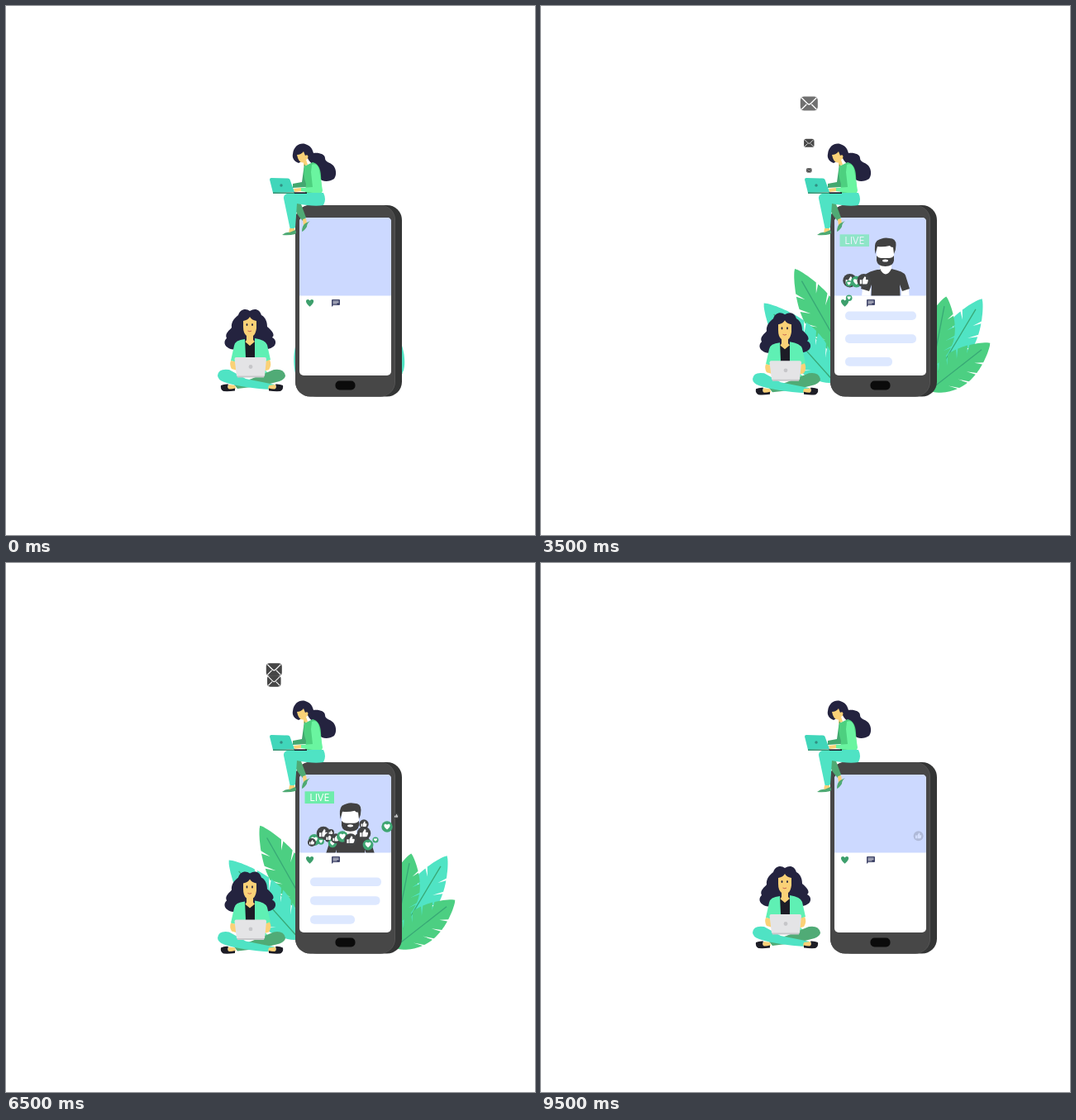
Recreate the animation shown at these times as an HTML page. Size 640x640 px, loop 9570 ms.

```html
<!DOCTYPE html>
<html lang="en">
<head>
<meta charset="utf-8">
<title>Live stream</title>
<style>
  html, body { margin: 0; width: 100%; height: 100%; overflow: hidden; background: #fff; }
  svg { display: block; width: 100vw; height: 100vh; }
  text { font: 12.3px "Open Sans", "Noto Sans", sans-serif; fill: #fff; }
</style>
</head>
<body>
<svg viewBox="0 0 640 640">
  <defs>
    <clipPath id="video"><path d="M355 350.5V261q0-5 5-5h101q5 0 5 5v89.5z"/></clipPath>
    <clipPath id="feed"><rect x="355" y="351" width="111" height="96"/></clipPath>
    <path id="heartShape" d="M0 5.2C-8-1-5.5-5-2.8-5-1.2-5 0-3.4 0-3.4S1.2-5 2.8-5C5.5-5 8-1 0 5.2z"/>
    <g id="heart"><circle r="10" fill="#3fa673"/><use href="#heartShape" fill="#fff"/></g>
    <g id="thumb">
      <circle r="10" fill="#434546"/>
      <path fill="#fff" d="M-6-1h3v6h-3zM-2-1 1-6q2 0 2 2L2.500-1.500H5q1.500 0 1 2L5 4q-.5 1.200-2 1.200h-5z"/>
    </g>
    <g id="mail">
      <rect x="-10.500" y="-8.500" width="21" height="17" rx="4.500" fill="#464646"/>
      <path d="M-9-7-2 0Q0 2 2 0L9-7M-9 7-3 1M9 7 3 1" fill="none" stroke="#fff" stroke-width="1.300"/>
    </g>
    <g id="foot">
      <path fill="#fad177" d="M269 458l8 1 1 4-6 2-4-2z"/>
      <path fill="#1d1d26" d="M260 459q4-2 9-1.500-2 5 1 6 4 0 7-1v3q-8 1-14 .5-4-2-3-7z"/>
    </g>
  </defs>

  <g id="leaves"></g>

  <!-- phone -->
  <rect x="358" y="241" width="121" height="231.500" rx="18" fill="#343535"/>
  <rect x="350" y="241" width="121" height="231.500" rx="18" fill="#5b5b5b"/>
  <rect x="350" y="241" width="120.300" height="231.500" rx="18" fill="#474747"/>
  <rect x="355" y="256" width="111" height="191" rx="5" fill="#fff"/>
  <rect x="398.500" y="453.500" width="24" height="11" rx="5" fill="#0b0b0b"/>
  <g id="bars" clip-path="url(#feed)" fill="#dde8ff"></g>
  <g clip-path="url(#video)">
    <rect x="355" y="256" width="111" height="95" fill="#ccd9ff"/>
    <g id="host">
      <path fill="#fff" d="M389 342h10l-1 18h-11zM436 342h9l1 18h-10zM406 289h21v17l-3 6v9q-7 8-14 0v-9l-4-6z"/>
      <path fill="#414141" d="M410 318q7 13 14 0 15 3 17 8l5 16-9 3-3-8 1 25h-36l1-25-3 8-10-3 5-16q3-5 19-8z"/>
      <path fill="#414141" d="M404.500 300q-2-12 2-16 8-5 15-3 8 0 8 8 0 6-2.500 11l-1-8q-3 0-4-2-8 2-15 1z"/>
      <path fill="#414141" d="M406 302v6q1 7 10.500 7T427 308v-6q-2 3-6 3h-9q-4 0-6-3z"/>
      <ellipse cx="416.500" cy="308" rx="3.500" ry="1.600" fill="#fff"/>
    </g>
  </g>
  <g id="live">
    <rect x="361.500" y="276.300" width="35.500" height="14.700" fill="#6eecab"/>
    <text x="379.300" y="288" text-anchor="middle">LIVE</text>
  </g>
  <use href="#heartShape" transform="translate(367.600 359.300) scale(.85)" fill="#3d9f6c"/>
  <path fill="#41466a" d="M395 355h8q1 0 1 1v5q0 1-1 1h-7l-2 2v-8q0-1 1-1z"/>
  <path stroke="#fff" stroke-width=".7" d="M395.500 357h7M395.500 358.600h7M395.500 360.200h5"/>

  <g id="mails"></g>

  <!-- woman on the phone -->
  <g>
    <path fill="#24233f" d="M347 179C348 169 356 165 362 167 369 169 371 174 372 178 378 177 386 179 386 184 386 189 392 189 396 193 400 198 400 205 397 209 391 213 382 213 379 208 376 202 378 196 372 192 368 189 366 187 365 184L354 190C348 188 346 183 347 179z"/>
    <path fill="#fad177" d="M352 180q5 0 8-4l2 5q3-2 3.500 1 0 3-2.500 4l2 6-5 2v-4.500q-6 1-8-9.500z"/>
    <path fill="#4faa74" d="M346 237h10l7 19-4 4q-9-9-13-23z"/>
    <path fill="#fad177" d="M359 258l4-1 1 6-4 3z"/>
    <path fill="#4faa74" d="M358 273q0-7 4-10l6-3q-4 3-4 7-3 5-6 6z"/>
    <path fill="#43a870" d="M361 191l-3 22-11 2v5l16-1 2-20z"/>
    <path fill="#4dd07f" d="M361 194l10-5q9 2 10 16l1 22-20 1 1-13q-4-10-2-21z"/>
    <path fill="#6af5a0" d="M370 192q7-3 9 7l4 24q0 4-5 4l-21-3v-4l14-1-2-18z"/>
    <path fill="#fad177" d="M348 221l9-1v4l-8 1z"/>
    <path fill="#4fe3c4" d="M336 233q-1-6 8-7h40q4 8 0 15-12 2-32-2l-2 29-6 3z"/>
    <path fill="#fad177" d="M343 269h6l1 5-8 1z"/>
    <path fill="#4faa74" d="M334 277q5-4 9-3l7-3q2 3 0 5-8 2-16 1z"/>
    <path stroke="#151522" stroke-width="1.600" d="M348 226.200h16"/>
    <path fill="#40d6ba" d="M319 210q0-2 2-2l20 .5q2 0 2.500 1.500L349 225l-26 1z"/>
    <path stroke="#2d8f6d" stroke-width="1.500" d="M323 226.200h26"/>
    <circle cx="333" cy="217" r="1.700" fill="#328f82"/>
  </g>

  <!-- woman on the ground -->
  <g id="sitter">
    <path fill="#24233f" d="M295 369C301 365 307 367 309 374 315 377 316 384 316 388 322 393 326 398 322 401 328 404 327 411 322 413 316 417 308 415 305 410L285 411C281 416 272 417 268 413 263 410 264 404 267 402 264 396 271 392 273 389 272 382 277 377 281 374 283 367 290 365 295 369z"/>
    <path fill="#fad177" d="M287 381q6-1 8-5 2 4 8 5v9q-1 7-4 9v5l3 3-7 6-6-6 2-3v-5q-4-3-4-11z"/>
    <path fill="#1c1c26" d="M289 406l6 5 6-5 2 24h-14z"/>
    <path fill="#5ff0b4" d="M289 403q-12 1-13 8l-4 18 11 3 7-7zM301 402q13 2 15 8l4 18-9 4-10-6z"/>
    <path fill="#fad177" d="M272 429q-2 5 1 10l7 2v-10zM319 428q3 6-1 12l-7 2v-11z"/>
    <path fill="#5ff0b4" d="M309 440l5 1 8 8-10 4z"/>
    <path fill="#50ab76" d="M338 447q-2-9-14-7l-27 11-21 7 4 5q30-3 51-9 7-3 7-7z"/>
    <path fill="#4fe3c4" d="M256 447q1-9 14-7l20 11 35 7-4 6q-36-2-57-9-8-3-8-8z"/>
    <use href="#foot"/>
    <use href="#foot" transform="translate(595 0) scale(-1 1)"/>
    <path fill="#c7c7ca" d="M279 446h34l-1 3.500h-32z"/>
    <path fill="#e4e4e6" d="M276.500 427q0-2 2-2h34.500q2 0 2 2l-2 20.500h-34z"/>
    <circle cx="296" cy="436.500" r="2.400" fill="#c6c6c9"/>
    <g id="eyes" fill="#24233f"><ellipse cx="291.500" cy="385.500" rx=".9" ry="1.600"/><ellipse cx="298" cy="385.500" rx=".9" ry="1.600"/></g>
    <path d="M292.500 393q2.500 1.600 4.500 0" fill="none" stroke="#c0584f" stroke-width=".9"/>
  </g>

  <g id="reactions"></g>
</svg>
<script>
const LOOP = 9570, HALF = LOOP / 2;
const $ = id => document.getElementById(id);
const span = (t, a, b) => Math.min(1, Math.max(0, (t - a) / (b - a)));
const smooth = u => (1 - Math.cos(Math.PI * u)) / 2;
const cubeIn = u => u ** 3;
const cubeOut = u => 1 - (1 - u) ** 3;

// Eased interpolation through [time, value] keys
function tween(t, ...keys) {
  let value = keys[0][1];
  for (let i = 1; i < keys.length; i++) {
    const [a, from] = keys[i - 1], [b, to] = keys[i];
    if (t >= a) value = from + (to - from) * smooth(span(t, a, b));
  }
  return value;
}

function fill(id, items, markup) {
  $(id).innerHTML = items.map(markup).join('');
  return [...$(id).children];
}

function place(el, x, y, scale, opacity) {
  el.setAttribute('transform', `translate(${x} ${y}) scale(${scale})`);
  el.setAttribute('opacity', opacity);
}

const GREEN = '#4ccf82', TEAL = '#50e4c4';
const leaves = [
  { x: 367, y: 423, len: 121, w: 22, rest: -29.7, hidden: 25, dip: 3.8, exit: 6350, color: GREEN },
  { x: 355, y: 455, len: 128, w: 25, rest: -41.8, hidden: 25, dip: 8.8, exit: 6740, color: TEAL },
  { x: 479, y: 445, len: 106, w: 21, rest: 31, hidden: -33, dip: 6.6, exit: 6800, color: TEAL },
  { x: 474, y: 435, len: 85, w: 19, rest: 11, hidden: -35, dip: -1, exit: 6500, color: GREEN },
  { x: 470, y: 465, len: 93, w: 21, rest: 52, hidden: -30, dip: 3, exit: 7020, color: GREEN }
];

function leafPath({ len, w }) {
  const half = s => w * Math.sin(Math.PI * s ** 0.85) ** 0.8;
  const steps = 40, notches = [12, 18, 24, 30], left = [], right = [];
  for (let i = 0; i <= steps; i++) {
    const s = i / steps, h = i % steps ? half(s) : 0;
    left.push([-h, -s * len]);
    right.push([h, -s * len]);
    if (notches.includes(i)) {
      left.push([-h * 0.5, -(s - 0.07) * len]);
      right.push([h * 0.5, -(s - 0.07) * len]);
    }
  }
  return 'M' + left.concat(right.reverse()).map(p => p.map(v => v.toFixed(1))).join('L') + 'z';
}

const leafEls = fill('leaves', leaves, l =>
  `<g><path d="${leafPath(l)}" fill="${l.color}"/>
   <path d="M0 0V${-l.len * 0.86}" stroke="#38a876" stroke-width="1.300"/></g>`);

const bars = [
  { y: 380.5, w: 86, enter: 165, exit: 3000 },
  { y: 403, w: 86, enter: 535, exit: 3100 },
  { y: 425.8, w: 57, enter: 710, exit: 3300 }
];
const barEls = fill('bars', bars, () => '<rect x="368" height="10.600" rx="5"/>');

const mailStarts = [577, 1038, 2320, 3112, 3390, 4770, 5610, 5844, 7259, 7517];
const mailEls = fill('mails', mailStarts, () => '<use href="#mail"/>');

// dx, dy from the burst centre, radius, heart?, birth, death
const reactions = [
  [5, 0, 7, 1, 4500, 9000], [16, -8, 8.3, 0, 1300, 7900], [13, 2, 3.8, 1, 1400, 8800],
  [2, 3, 5, 0, 4700, 7500], [23, -3, 6, 0, 3900, 8600], [25, -9, 4, 0, 4300, 8700],
  [27, 4, 5.3, 1, 4100, 8900], [31, -1.7, 6, 0, 3700, 9620], [39, -4, 6.8, 1, 1550, 8500],
  [49, 0, 7.8, 0, 3650, 8500], [65, -8, 8.3, 0, 2200, 8200], [65, -19, 5.7, 0, 3600, 7880],
  [70, 6, 6.4, 1, 3300, 7930], [79, 0, 3.6, 1, 3800, 8050], [93, -16, 6.7, 1, 3550, 7350],
  [104, -29, 3.6, 0, 3600, 6950]
];
const reactionEls = fill('reactions', reactions, r => `<use href="#${r[3] ? 'heart' : 'thumb'}"/>`);

function draw(t) {
  const cycle = t % HALF;

  leaves.forEach((l, i) => {
    const swing = l.rest - l.hidden, side = Math.sign(swing);
    const enter = tween(t, [0, l.hidden], [1030, l.rest + side * 5],
      [1900, l.rest - side * l.dip], [2900, l.rest]);
    const angle = enter - swing * cubeIn(span(t, l.exit, l.exit + 1100));
    const away = t === 0 || t > l.exit + 1100;
    leafEls[i].setAttribute('transform', `translate(${l.x} ${l.y}) rotate(${angle})`);
    leafEls[i].setAttribute('visibility', away ? 'hidden' : 'visible');
  });

  bars.forEach((b, i) => {
    const grow = cubeOut(span(cycle, b.enter, b.enter + 1600));
    const rise = 88 * cubeIn(span(cycle, b.exit, b.exit + 1000));
    barEls[i].setAttribute('width', b.w * grow);
    barEls[i].setAttribute('y', b.y + 8.5 * (1 - grow) - rise);
    barEls[i].setAttribute('opacity', 1 - span(cycle, b.exit + 500, b.exit + 950));
  });

  mailStarts.forEach((start, i) => {
    const u = span(t, start, start + 2050), y = 215 - 105 * cubeOut(u);
    place(mailEls[i], 324.3, y, (5 + (207 - y) * 0.18) / 21, u > 0 ? 1 - span(u, 0.5, 0.83) : 0);
  });

  const spread = Math.exp(0.35 * (t / 1000 - 6.5));
  reactions.forEach(([dx, dy, r, , birth, death], i) => {
    const b = smooth(span(t, birth, birth + 700));
    place(reactionEls[i], 368 + dx * spread * b, 357 + (dy * spread - 22) * b,
      r / 10 * (0.5 + b / 2), t > birth ? 1 - span(t, death - 600, death) : 0);
  });

  const hostY = tween(t, [200, 72], [2400, 0], [5900, 0], [8400, 72]);
  $('host').setAttribute('transform', `translate(0 ${hostY})`);
  $('live').setAttribute('opacity', tween(cycle, [300, 0], [1300, 1], [2900, 1], [4400, 0]));

  const bob = tween(t, [0, 0], [2035, 9], [4900, 0], [5300, 0], [7500, 11.3], [9550, 0]);
  $('sitter').setAttribute('transform', `translate(0 ${bob})`);
  $('eyes').setAttribute('visibility', Math.abs(t - 5500) < 100 ? 'hidden' : 'visible');
}

const begin = performance.now();
function tick() {
  draw((performance.now() - begin) % LOOP);
  requestAnimationFrame(tick);
}
draw(0);
requestAnimationFrame(tick);
</script>
</body>
</html>
```
